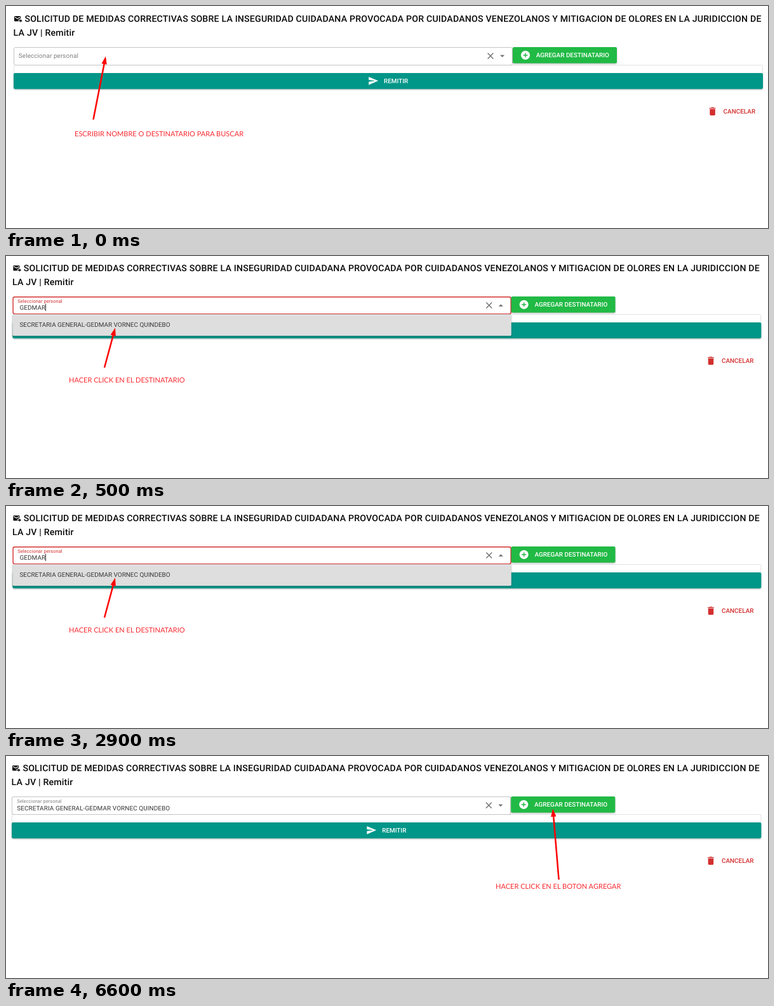
An HTML page that plays this animation: 1200 px wide and 351 px high, repeating every 8 s.

```html
<!DOCTYPE html>
<html lang="es">
<head>
<meta charset="utf-8">
<title>Remitir</title>
<style>
  html, body { margin: 0; width: 100%; height: 100%; overflow: hidden; background: #fff; }
  svg { display: block; width: 100%; height: 100%; }
  text { font-family: Roboto, Arial, sans-serif; font-size: 9.93px; fill: #383838; text-rendering: geometricPrecision; }
  .title { font-size: 14.18px; font-weight: 500; letter-spacing: .0125em; fill: #0c0c0c; }
  .btn { font-weight: 500; fill: #fff; }
  .field { letter-spacing: .00937em; }
  .label { fill: #808080; letter-spacing: .00937em; }
  .small { font-size: 7.45px; }
  .note { font-family: Lato, Carlito, sans-serif; font-size: 11.05px; fill: #f92a30; }
  .red { fill: #d32f2f; }
  .lift { filter: drop-shadow(0 1px 1px rgba(0, 0, 0, .3)); }
</style>
</head>
<body>
<svg id="stage" viewBox="0 0 1200 351" preserveAspectRatio="none"></svg>
<script>
const LOOP = 8000;
const STARTS = [0, 500, 4500];
const ICON = 0.709;
const PERSON = 'SECRETARIA GENERAL-GEDMAR VORNEC QUINDEBO';

const text = (x, y, cls, str) => `<text x="${x}" y="${y}" class="${cls}">${str}</text>`;
const rect = (x, y, w, h, r, attrs) =>
  `<rect x="${x}" y="${y}" width="${w}" height="${h}" rx="${r}" ${attrs}/>`;
const icon = (x, y, fill, d) =>
  `<path transform="translate(${x - 12 * ICON} ${y - 12 * ICON}) scale(${ICON})" fill="${fill}" d="${d}"/>`;

function arrow(x1, y1, x2, y2) {
  const angle = Math.atan2(y2 - y1, x2 - x1) * 180 / Math.PI;
  const len = Math.hypot(x2 - x1, y2 - y1);
  return `<g transform="translate(${x1} ${y1}) rotate(${angle})" fill="#f00">
    <path d="M0 -1.25H${len - 10}V1.25H0z"/>
    <path d="M${len} 0L${len - 12.5} -4.2V4.2z"/></g>`;
}

const mail = `<rect x="13" y="16" width="10.2" height="8.2" rx="1" fill="#0c0c0c"/>
  <path d="M13.9 17.5L18.1 20.2L22.3 17.5" fill="none" stroke="#fff" stroke-width="1.1"/>
  <path d="M20.2 22.4H22.6V20.7L25.5 23.3L22.6 25.9V24.2H20.2z" fill="#0c0c0c"
    stroke="#fff" stroke-width="1.6" paint-order="stroke"/>`;

const page = (open) => `
  ${mail}
  ${text(29.4, 24.6, 'title', 'SOLICITUD DE MEDIDAS CORRECTIVAS SOBRE LA INSEGURIDAD CUIDADANA PROVOCADA POR CUIDADANOS VENEZOLANOS Y MITIGACION DE OLORES EN LA JURIDICCION DE')}
  ${text(11.6, 47.2, 'title', 'LA JV | Remitir')}
  ${rect(12.5, 93.5, 1179, 14, 2, 'fill="#fff" stroke="#e2e2e2"')}
  ${open
    ? rect(12.7, 65.7, 784.8, 27, 2.6, 'fill="#fff" stroke="#d32f2f" stroke-width="1.4"')
    : rect(12.5, 65.5, 785, 28, 2.6, 'fill="#fff" stroke="#c4c4c4"')}
  <path d="M758.6 74.6L767.4 83.4M767.4 74.6L758.6 83.4" stroke="#707070" stroke-width="1.4"/>
  <path d="${open ? 'M778 80.8H785.2L781.6 77.2z' : 'M778 77.4H785.2L781.6 81z'}" fill="#707070"/>
  ${rect(798, 65, 164, 25.6, 2.1, 'fill="#21ba45" class="lift"')}
  <circle cx="818" cy="77.8" r="7.1" fill="#fff"/>
  <path d="M814.5 77.8H821.5M818 74.3V81.3" stroke="#21ba45" stroke-width="1.4"/>
  ${text(834.8, 81.3, 'btn', 'AGREGAR DESTINATARIO')}
  ${rect(12, 106, 1180, 25.2, 2.1, 'fill="#009688" class="lift"')}
  ${icon(578.3, 118.3, '#fff', 'M2 21L23 12L2 3V10L17 12L2 14z')}
  ${text(595, 121.8, 'btn', 'REMITIR')}
  ${icon(1112.6, 166.6, '#d32f2f', 'M6 19q0 2 2 2h8q2 0 2-2V7H6zM19 4h-3.5l-1-1h-5l-1 1H5v2h14z')}
  ${text(1129.6, 170.1, 'btn red', 'CANCELAR')}`;

const placed = (dx, zoom, body) => `<g transform="translate(${dx} -1) scale(${zoom} 1)">${body}</g>`;

const scenes = [
  page(false)
    + text(19.8, 82.4, 'label', 'Seleccionar personal')
    + arrow(137.5, 179.5, 157, 79.5)
    + text(108, 206, 'note', 'ESCRIBIR NOMBRE O DESTINATARIO PARA BUSCAR'),

  placed(-1.6, 0.9991, page(true))
    + text(18.2, 74.2, 'label small red', 'Seleccionar personal')
    + text(21.4, 85.2, 'field', 'GEDMAR')
    + rect(62, 75.5, 0.9, 11.5, 0, 'fill="#212121"')
    + rect(10.3, 92, 785.5, 34.2, 2, 'fill="#dedede" class="lift"')
    + text(21.4, 112, '', PERSON)
    + arrow(155, 176.5, 172, 113.5)
    + text(99, 200.4, 'note', 'HACER CLICK EN EL DESTINATARIO'),

  placed(-3, 1.0003, page(false))
    + text(17.2, 74.4, 'label small', 'Seleccionar personal')
    + text(17.2, 86.1, 'field', PERSON)
    + arrow(870.6, 195.5, 861.2, 83.5)
    + text(771, 210.4, 'note', 'HACER CLICK EN EL BOTON AGREGAR')
];

const stage = document.getElementById('stage');
stage.innerHTML = scenes.map(s => `<g display="none">${s}</g>`).join('');
const layers = [...stage.children];

const origin = performance.now();
function draw(now) {
  const t = Math.max(0, now - origin) % LOOP;
  const current = STARTS.filter(s => s <= t).length - 1;
  layers.forEach((g, i) => g.setAttribute('display', i === current ? 'inline' : 'none'));
  requestAnimationFrame(draw);
}
draw(origin);
</script>
</body>
</html>
```
